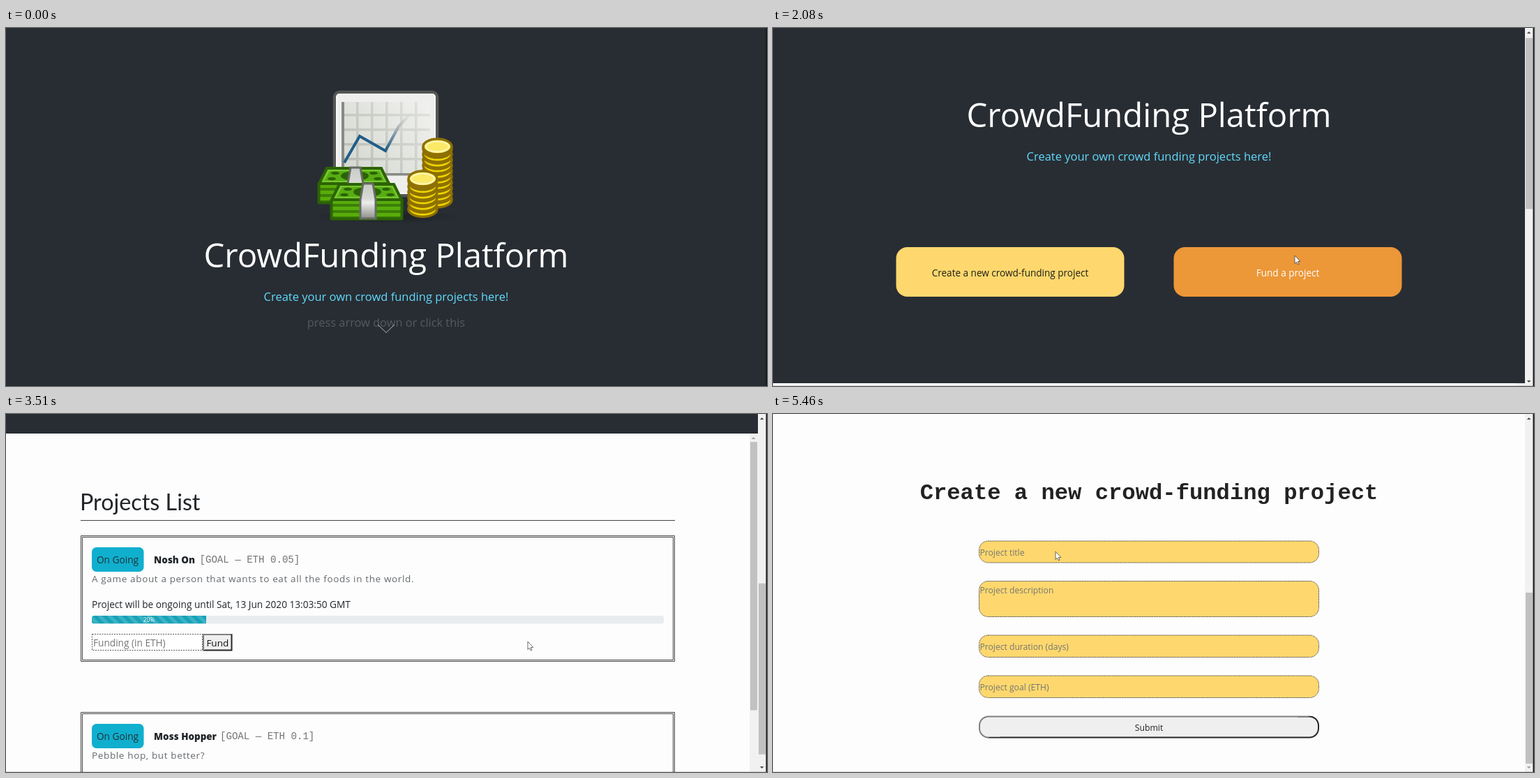
Recreate the animation shown at these times as an HTML page with a canvas. Size 1091 by 513 pixels, loop 5.59 s.

```html
<!DOCTYPE html>
<html lang="en">
<head>
<meta charset="utf-8">
<title>CrowdFunding Platform</title>
<style>
html, body { margin: 0; width: 100%; height: 100%; overflow: hidden; background: #282d33; }
canvas { display: block; width: 1091px; height: 513px; }
</style>
</head>
<body>
<canvas id="stage" width="1091" height="513"></canvas>
<script>
const ctx = document.getElementById('stage').getContext('2d');
const W = 1091, H = 513, LOOP = 5590, STEP = 130;
const SANS = '"Open Sans", "Noto Sans", sans-serif';
const MONO = '"Liberation Mono", "Courier New", monospace';
const DARK = '#282d33', PAPER = '#fdfdfd', YELLOW = '#fed86e', ORANGE = '#ec9738', GREY = '#757575', INK = '#212529';

// Piecewise linear value through [time, value] points.
function track(t, keys) {
  if (t <= keys[0][0]) return keys[0][1];
  for (let i = 1; i < keys.length; i++) {
    const [t0, a] = keys[i - 1], [t1, b] = keys[i];
    if (t <= t1) return a + (b - a) * (t - t0) / (t1 - t0);
  }
  return keys[keys.length - 1][1];
}

const SCROLL = [[1950, 0], [2080, 4], [2210, 90], [2340, 300], [2470, 470], [2600, 513],
  [2990, 513], [3120, 500], [3510, 485], [3770, 430], [3900, 400], [4290, 301],
  [4680, 150], [4940, 150], [5070, 210], [5200, 380], [5330, 495], [5460, 513]];
const MOUSE_X = [[1300, 545], [1560, 400], [1820, 748], [4420, 748], [4550, 560], [4810, 405]];
const MOUSE_Y = [[1300, 441], [1560, 350], [1820, 326], [4420, 326], [4550, 300], [4810, 197]];

function text(str, x, y, size, color, o = {}) {
  ctx.font = `${o.weight || 400} ${size}px ${o.font || SANS}`;
  ctx.letterSpacing = (o.gap || 0) + 'px';
  ctx.textAlign = o.align || 'left';
  ctx.fillStyle = color;
  ctx.fillText(str, x, y);
}

function rect(x, y, w, h, color) {
  ctx.fillStyle = color;
  ctx.fillRect(x, y, w, h);
}

function round(x, y, w, h, r, fill, stroke, line = 1, dash = []) {
  ctx.beginPath();
  ctx.roundRect(x, y, w, h, r);
  if (fill) { ctx.fillStyle = fill; ctx.fill(); }
  if (stroke) {
    ctx.strokeStyle = stroke;
    ctx.lineWidth = line;
    ctx.setLineDash(dash);
    ctx.stroke();
    ctx.setLineDash([]);
  }
}

function poly(points, fill, stroke, line = 1, open) {
  ctx.beginPath();
  points.forEach(([x, y]) => ctx.lineTo(x, y));
  if (!open) ctx.closePath();
  if (fill) { ctx.fillStyle = fill; ctx.fill(); }
  if (stroke) { ctx.strokeStyle = stroke; ctx.lineWidth = line; ctx.stroke(); }
}

function oval(x, y, rx, ry, fill, stroke, line = 1) {
  ctx.beginPath();
  ctx.ellipse(x, y, rx, ry, 0, 0, 7);
  if (fill) { ctx.fillStyle = fill; ctx.fill(); }
  if (stroke) { ctx.strokeStyle = stroke; ctx.lineWidth = line; ctx.stroke(); }
}

function fade(x0, y0, x1, y1, ...stops) {
  const g = ctx.createLinearGradient(x0, y0, x1, y1);
  stops.forEach(([at, c]) => g.addColorStop(at, c));
  return g;
}

// Raised box: light top-left edge, dark bottom-right edge.
function raised(x, y, w, h, r) {
  const cx = x + w / 2, cy = y + h / 2;
  const edge = fade(cx - h, cy - w, cx + h, cy + w, [0.5, '#808080'], [0.5, '#262626']);
  round(x + 1, y + 1, w - 2, h - 2, r, '#efefef', edge, 2);
}

function chartBoard() {
  round(471, 92, 147, 148, 7, '#eeeeec', '#555753', 4.5);
  round(474, 95, 141, 142, 4, null, '#fafaf9', 2);
  rect(485, 106, 123, 103, fade(485, 209, 608, 106, [0, '#d3d7cf'], [1, '#f1f1ef']));
  const grid = fade(485, 209, 608, 106, [0, '#b4b8b0'], [1, '#e2e4df']);
  for (let i = 0; i < 5; i++) rect(502 + i * 21, 106, 3.5, 103, grid);
  for (let i = 0; i < 4; i++) rect(485, 123 + i * 21, 123, 3.5, grid);
  rect(481, 106, 4, 105, '#888a85');
  rect(481, 208, 127, 3.5, '#888a85');
  const blue = fade(544, 176, 590, 112, [0, '#215d88'], [0.1, '#3a6c8e'], [0.5, '#b4babb'], [0.9, 'rgba(220,222,218,0)']);
  poly([[485, 193], [507, 155], [544, 176], [563, 141], [590, 112]], null, blue, 4, true);
}

function bills(x, y) {
  const edge = '#2c6306';
  rect(x + 1, y + 24, 102, 27, '#58ad0b');
  for (let i = 0; i < 3; i++) rect(x + 1, y + 30 + i * 9, 102, 4, '#3c7f07');
  round(x + 1.5, y + 24, 101, 27.5, 1, null, edge, 4);
  poly([[x + 13, y + 2], [x + 91, y + 2], [x + 102, y + 24], [x + 2, y + 24]], '#78c832', edge, 4);
  poly([[x + 17, y + 6], [x + 88, y + 6], [x + 95, y + 20], [x + 9, y + 20]], '#57ad12');
  oval(x + 53, y + 13, 20, 7, edge);
  [[25, 9], [80, 9], [20, 17], [86, 17]].forEach(([a, b]) => oval(x + a, y + b, 6, 2.2, edge));
  poly([[x + 47, y + 1], [x + 61, y + 1], [x + 65, y + 24], [x + 65, y + 51], [x + 43, y + 51], [x + 43, y + 24]],
    fade(0, y, 0, y + 51, [0, '#c8cac6'], [0.45, '#d8dad6'], [0.55, '#eeeeec'], [1, '#8d908a']), '#666a63', 3);
}

function coins(x, top, n) {
  for (let i = n; i >= 0; i--) {
    const y = top + i * 8.1;
    oval(x, y + 3, 20.5, 11, '#edd400', '#8d7000', 3.5);
    oval(x, y - 1, 20.5, 10.5, '#8d7000');
  }
  oval(x, top, 20.5, 11, '#f3df4a', '#8d7000', 3.5);
  oval(x, top, 16.5, 7.5, '#fae967', '#fff5ac', 2.5);
}

function icon() {
  const shade = ctx.createRadialGradient(0, 0, 10, 0, 0, 105);
  shade.addColorStop(0, 'rgba(0,0,0,.3)');
  shade.addColorStop(1, 'rgba(0,0,0,0)');
  ctx.save();
  ctx.translate(545, 270);
  ctx.scale(1, 0.1);
  oval(0, 0, 105, 105, shade);
  ctx.restore();
  chartBoard();
  bills(447, 199);
  coins(618.5, 170, 9);
  coins(597.5, 216, 5);
  bills(465, 222);
}

const BUTTONS = [[-362.5, 'Create a new crowd-funding project'], [35.5, 'Fund a project']];

function hero(t, cx, mouse) {
  const lift = track(t, [[390, 196.5], [910, 0]]);
  const iconAlpha = track(t, [[130, 1], [520, 0]]);
  const hintAlpha = track(t, [[0, 1], [390, 0]]);
  rect(0, 0, W, H, DARK);
  if (iconAlpha) {
    ctx.save();
    ctx.globalAlpha = iconAlpha;
    ctx.translate(cx - 545, 0);
    icon();
    ctx.restore();
  }
  text('CrowdFunding Platform', cx, 146 + lift, 47.25, '#fff', { align: 'center' });
  text('Create your own crowd funding projects here!', cx, 194 + lift, 16.5, '#61dafb', { align: 'center' });
  if (hintAlpha) {
    ctx.globalAlpha = hintAlpha;
    text('press arrow down or click this', cx, 427.5, 16.4, '#565a5e', { align: 'center' });
    poly([[cx - 12, 425], [cx, 436.5], [cx + 12, 425]], null, '#b4b6b9', 1, true);
  }
  ctx.globalAlpha = track(t, [[650, 0], [1040, 1]]);
  BUTTONS.forEach(([dx, label]) => {
    const x = cx + dx, y = 318;
    const hot = mouse && mouse.x > x && mouse.x < x + 327 && mouse.y > y && mouse.y < y + 71;
    round(x, y, 327, 71, 16, hot ? ORANGE : YELLOW);
    text(label, x + 163.5, 359.5, 13.55, hot ? '#fff' : '#1f1d18', { align: 'center' });
  });
  ctx.globalAlpha = 1;
}

function progress(y, share, t) {
  const w = 820 * share, tile = 14.2;
  ctx.save();
  round(123, y, 820, 11.5, 3.5, '#e9ecef');
  ctx.clip();
  rect(123, y, w, 11.5, '#17a2b8');
  ctx.beginPath();
  ctx.rect(123, y, w, 11.5);
  ctx.clip();
  const shift = tile * (1 - t / 1000 % 1);
  for (let x = 95 + shift; x < 123 + w; x += tile)
    poly([[x, y], [x + 7.1, y], [x + 18.6, y + 11.5], [x + 11.5, y + 11.5]], 'rgba(255,255,255,.16)');
  ctx.restore();
  text(Math.round(share * 100) + '%', 123 + w / 2, y + 9, 8.5, '#fff', { align: 'center' });
}

function card(y, p, t) {
  round(107.5, y + 0.5, 851, 180, 0, null, '#444');
  round(109.5, y + 2.5, 847, 176, 0, null, '#444');
  round(123, y + 17, 74.5, 35, 6.5, '#10afce');
  text('On Going', 160, y + 40, 13.7, '#1f3238', { align: 'center' });
  text(p.name, 212, y + 40, 13.4, INK, { weight: 800 });
  text(`[GOAL — ETH ${p.goal}]`, p.goalX, y + 38.5, 14.1, '#747474', { font: MONO });
  text(p.about, 123, y + 66.5, 13.5, '#65696d', { gap: 0.64 });
  text(`Project will be ongoing until ${p.end} GMT`, 123, y + 103.5, 13.65, INK);
  progress(y + 115, p.share, t);
  round(123.5, y + 141.5, 158, 23, 0, '#fff', '#555', 1, [2, 1.5]);
  text('Funding (in ETH)', 125, y + 159, 13.65, GREY);
  raised(282, y + 141, 42.5, 24.5, 0);
  text('Fund', 303.3, y + 159, 13.5, '#111', { align: 'center' });
}

const PROJECTS = [
  { name: 'Nosh On', goal: '0.05', goalX: 277.5, share: 0.2, end: 'Sat, 13 Jun 2020 13:03:50',
    about: 'A game about a person that wants to eat all the foods in the world.' },
  { name: 'Moss Hopper', goal: '0.1', goalX: 307, share: 0.2, end: 'Thu, 04 Jun 2020 15:13:50',
    about: 'Pebble hop, but better?' }
];

function list(t) {
  text('Projects List', 106, 110, 32.3, INK, { font: 'Lato, Carlito, sans-serif' });
  rect(107, 124, 852, 1, '#444');
  PROJECTS.forEach((p, i) => card(146 + i * 253, p, t));
  scrollbar(1066, 12, 384.5, '#a3a3a3');
}

const FIELDS = [['title', 182, 31, 203], ['description', 239.5, 51, 256.5],
  ['duration (days)', 317, 31.5, 338], ['goal (ETH)', 375, 31.5, 396]];

function form() {
  text('Create a new crowd-funding project', 539, 122, 32.2, '#222', { font: MONO, weight: 700, align: 'center' });
  FIELDS.forEach(([label, y, h, base]) => {
    round(295.5, y, 487, h, 13, YELLOW, '#333', 1, [1.4, 1]);
    text('Project ' + label, 296.5, base, 12.15, GREY);
  });
  raised(295, 432.5, 488, 32, 13);
  text('Submit', 539, 453.5, 12.2, '#222', { align: 'center' });
}

function scrollbar(x, thumbY, thumbH, upColor, downColor = '#505050') {
  rect(x, 0, 12, H, '#f1f1f1');
  rect(x + 1, thumbY, 10, thumbH, '#c1c1c1');
  poly([[x + 2.8, 8], [x + 5.7, 5], [x + 8.6, 8]], upColor);
  poly([[x + 2.8, 505], [x + 5.7, 508], [x + 8.6, 505]], downColor);
}

function cursor(x, y) {
  poly([[x, y], [x, y + 11.5], [x + 2.6, y + 9.2], [x + 4.3, y + 13], [x + 6, y + 12.2],
    [x + 4.4, y + 8.6], [x + 7.8, y + 8.4]], '#fff', '#444', 0.8);
}

function draw(t) {
  const scroll = Math.round(track(t, SCROLL));
  const intro = t >= 260 && t < 780, paged = t >= 1950;
  const cx = intro || paged ? 539 : 545;
  const shown = t >= 1300 && (t < 4160 || t > 4420);
  const mx = track(t, MOUSE_X), my = track(t, MOUSE_Y);

  rect(0, 0, W, H, PAPER);
  ctx.save();
  ctx.translate(0, -scroll);
  hero(t, cx, shown && { x: mx, y: my + scroll });
  ctx.translate(0, H);
  if (paged) {
    rect(0, 0, W, H, PAPER);
    if (t < 4940) list(t); else form();
  }
  ctx.restore();

  if (intro) scrollbar(1078, 12, 400, '#a3a3a3');
  if (paged) {
    scrollbar(1078, 12.5 + scroll * 243.5 / H, 245, scroll ? '#505050' : '#a3a3a3', scroll < H ? '#505050' : '#a3a3a3');
  }
  rect(1089.5, 0, 1.5, H, '#14171a');
  rect(0, 512, 1090, 1, 'rgba(0,0,0,.14)');
  if (shown) cursor(mx, my);
}

const start = performance.now();
function tick() {
  const t = (performance.now() - start) % LOOP;
  draw(Math.floor(t / STEP) * STEP);
  requestAnimationFrame(tick);
}
tick();
</script>
</body>
</html>
```
